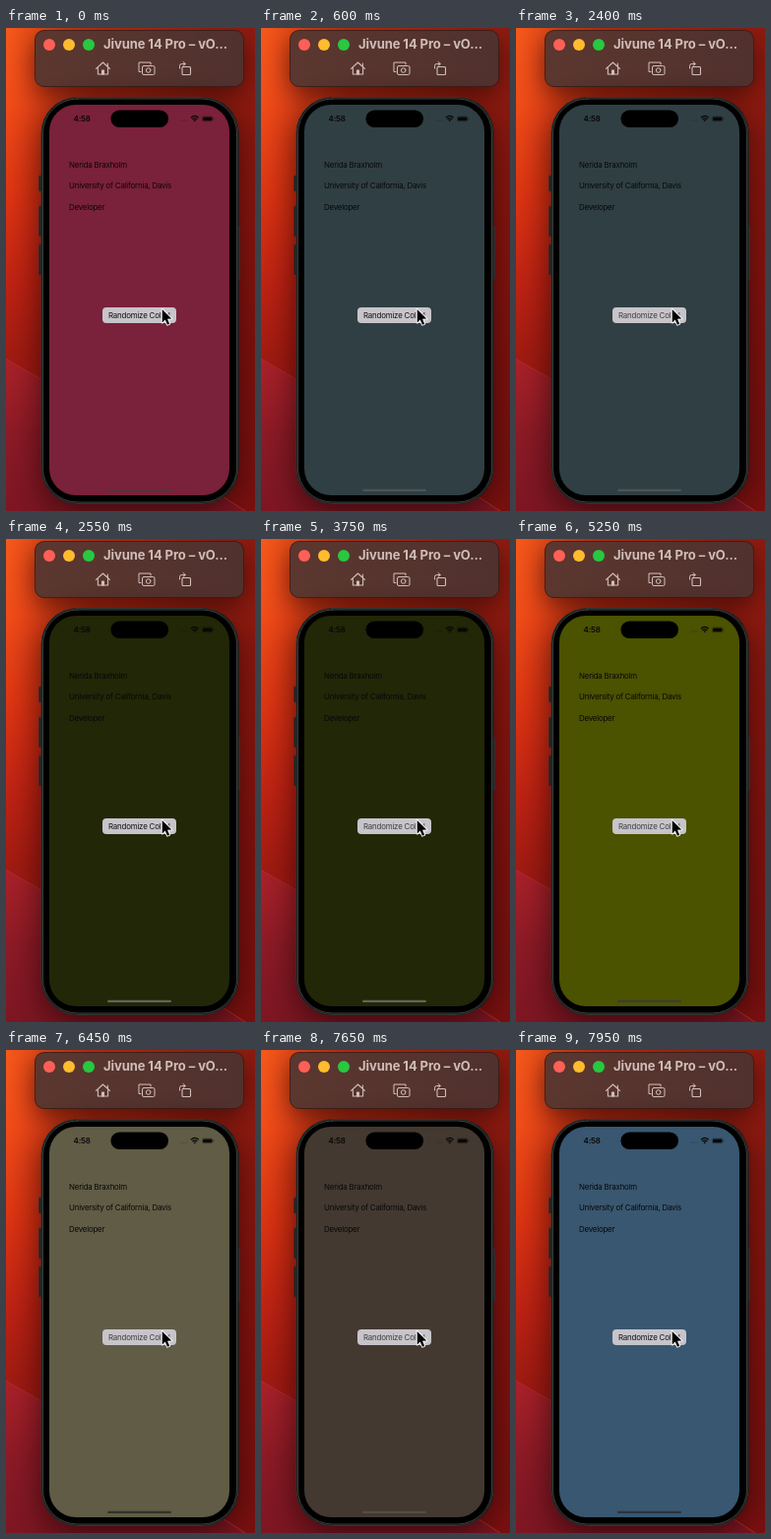
Write an HTML page with a canvas that moves like this. It is 253 by 491 pixels and loops after 8000 ms.

```html
<!DOCTYPE html>
<html lang="en">
<head>
<meta charset="utf-8">
<title>Randomize Color</title>
<style>
  html, body { margin: 0; width: 100%; height: 100%; overflow: hidden; background: #7c1712; }
  canvas { display: block; }
</style>
</head>
<body>
<canvas id="stage" width="253" height="491"></canvas>
<script>
const W = 253, H = 491, LOOP = 8000;
const ctx = document.getElementById('stage').getContext('2d');
const FONT = 'Inter, "Liberation Sans", sans-serif';

// Each tap dims the label at `press`, then a new colour follows.
const steps = [
  { start: 0, press: 450, color: '#7a213b', bar: '#5b3040' },
  { start: 600, press: 2400, color: '#303f44', bar: '#4d5354' },
  { start: 2550, press: 3750, color: '#222707', bar: '#63655a' },
  { start: 4050, press: 5250, color: '#4b5200', bar: '#3c3c36' },
  { start: 5400, press: 6450, color: '#605c46', bar: '#34332b' },
  { start: 6600, press: 7650, color: '#433930', bar: '#544d46' },
  { start: 7950, press: LOOP, color: '#395770', bar: '#28343f' }
];

function box(x, y, w, h, r, fill, stroke, line = 1) {
  ctx.beginPath();
  ctx.roundRect(x, y, w, h, r);
  if (fill) { ctx.fillStyle = fill; ctx.fill(); }
  if (stroke) { ctx.strokeStyle = stroke; ctx.lineWidth = line; ctx.stroke(); }
}

function shadowBox(x, y, w, h, r, alpha, blur, drop) {
  ctx.save();
  ctx.shadowColor = `rgba(20,0,0,${alpha})`;
  ctx.shadowBlur = blur;
  ctx.shadowOffsetY = drop;
  box(x, y, w, h, r, '#000');
  ctx.restore();
}

function disc(x, y, r, fill) {
  ctx.beginPath();
  ctx.arc(x, y, r, 0, Math.PI * 2);
  ctx.fillStyle = fill;
  ctx.fill();
}

function shape(points, fill) {
  ctx.beginPath();
  points.forEach(([x, y]) => ctx.lineTo(x, y));
  ctx.closePath();
  if (fill) { ctx.fillStyle = fill; ctx.fill(); }
}

function stroke(path, color, width) {
  ctx.strokeStyle = color;
  ctx.lineWidth = width;
  ctx.stroke(new Path2D(path));
}

function label(text, x, y, size, color, weight = 400, spacing = -0.2) {
  ctx.font = `${weight} ${size}px ${FONT}`;
  ctx.letterSpacing = spacing + 'px';
  ctx.fillStyle = color;
  ctx.fillText(text, x, y);
}

function gradient(x0, y0, x1, y1, colors) {
  const g = ctx.createLinearGradient(x0, y0, x1, y1);
  colors.forEach(([at, color]) => g.addColorStop(at, color));
  return g;
}

function drawWallpaper() {
  ctx.fillStyle = gradient(0, 0, 0, H, [
    [0, '#f6591a'], [0.16, '#f04d18'], [0.35, '#dd3512'],
    [0.52, '#c02413'], [0.68, '#a01b12'], [1, '#76131a']
  ]);
  ctx.fillRect(0, 0, W, H);
  ctx.fillStyle = gradient(0, 0, W, 0, [
    [0, 'rgba(170,20,14,0)'], [0.35, 'rgba(160,22,14,.6)'], [1, 'rgba(122,16,14,.85)']
  ]);
  ctx.fillRect(0, 0, W, H);

  shape([[0, 336], [36, 357], [243, 491], [0, 491]],
    gradient(0, 336, 0, H, [[0, '#ab2129'], [0.5, '#8c1a26'], [1, '#7c1622']]));
  stroke('M0 336.5 L36 357 L243 491', '#b5282b', 1);
}

function drawToolbar() {
  shadowBox(29.5, 2.5, 212, 57, 9, 0.6, 26, 8);
  box(29.5, 2.5, 212, 57, 9, gradient(30, 0, 242, 0, [[0, '#5b372f'], [1, '#50312e']]), '#3c1c18', 0.7);
  disc(44, 17, 6, '#ff5f57');
  disc(64, 17, 6, '#febc2e');
  disc(84, 17, 6, '#28c840');
  label('Jivune 14 Pro – vO...', 99, 21, 13, '#d0bdb8', 700, -0.08);

  const ink = '#d3c1bc';
  ctx.lineCap = ctx.lineJoin = 'round';
  stroke('M91.5 41.3 L98.5 35 L105.5 41.3 M93.4 40.5 V47 H103.6 V40.5 M103.3 36 V39', ink, 1.1);
  box(97, 42.5, 3, 5, 0.5, ink);
  stroke('M137 44.5 H135 V35 H147 V37', ink, 1);
  box(138.5, 38.5, 12.5, 9, 1.5, '#55342f', ink, 1);
  ctx.beginPath();
  ctx.arc(144.7, 43, 2.3, 0, Math.PI * 2);
  ctx.stroke();
  box(179, 39.5, 8.5, 8, 1, null, ink, 1.1);
  stroke('M176.5 41 V38.5 Q176.5 36.5 178.5 36.5 H182 M180 34.5 L182.3 36.5 L180 38.5', ink, 1);
}

function drawPhone() {
  shadowBox(36, 70.5, 200.5, 413, 36, 0.65, 34, 8);
  [[150, 16], [181, 31], [220, 31]].forEach(([y, h]) =>
    box(33.5, y, 3, h, 1, '#1f2120', '#303332', 0.5));
  box(235, 202, 2.5, 53, 1, '#1f2120', '#3a3e3c', 0.5);
  box(36, 70.5, 200, 413, 36.5, '#101312', '#303432', 1);
  box(37.5, 72, 197, 410, 35, '#000', '#505653', 0.7);
}

function drawStatus() {
  box(106.5, 83.5, 58.5, 17.5, 8.75, '#000');
  label('4:58', 68.5, 95, 8, '#080808', 600, -0.15);
  for (let i = 0; i < 4; i++) disc(178 + i * 2, 94, 0.5, 'rgba(0,0,0,.35)');
  ctx.lineCap = 'butt';
  stroke('M187.9 91.3 Q191.8 87.5 195.7 91.3 M189.4 93 Q191.8 90.6 194.2 93', '#080808', 1.25);
  shape([[190.6, 93.9], [191.8, 93.1], [193, 93.9], [191.8, 95.3]], '#080808');
  box(199.3, 89.8, 10.8, 5, 1.5, null, 'rgba(0,0,0,.45)', 0.5);
  box(200, 90.4, 9.4, 3.8, 1, '#080808');
  box(210.6, 91.4, 0.7, 1.8, 0.3, 'rgba(0,0,0,.5)');
}

function drawCursor() {
  const arrow = [[158.7, 286], [158.7, 299.4], [161.7, 296.6], [164, 301.7],
    [166.2, 300.7], [164, 295.8], [168.3, 295.6]];
  shape(arrow);
  ctx.lineJoin = 'round';
  ctx.strokeStyle = '#fff';
  ctx.lineWidth = 2;
  ctx.stroke();
  shape(arrow, '#000');
}

function drawScreen({ color, bar }, pressed) {
  box(44, 78, 183, 397, 27, color);
  drawStatus();
  ['Nerida Braxholm', 'University of California, Davis', 'Developer']
    .forEach((text, i) => label(text, 64, 142 + i * 21.3, 7.9, '#080808'));
  box(98, 284, 75, 16, 4, '#c7c4ca');
  label('Randomize Color!', 104, 294.8, 7.9, pressed ? '#3e3d42' : '#101012');
  box(103, 468.8, 65, 2.3, 1.15, bar);
}

function draw(now) {
  const t = now % LOOP;
  const step = steps.findLast(s => t >= s.start);
  drawWallpaper();
  drawToolbar();
  drawPhone();
  drawScreen(step, t >= step.press);
  drawCursor();
}

function tick() {
  draw(performance.now());
  requestAnimationFrame(tick);
}
tick();
</script>
</body>
</html>
```
